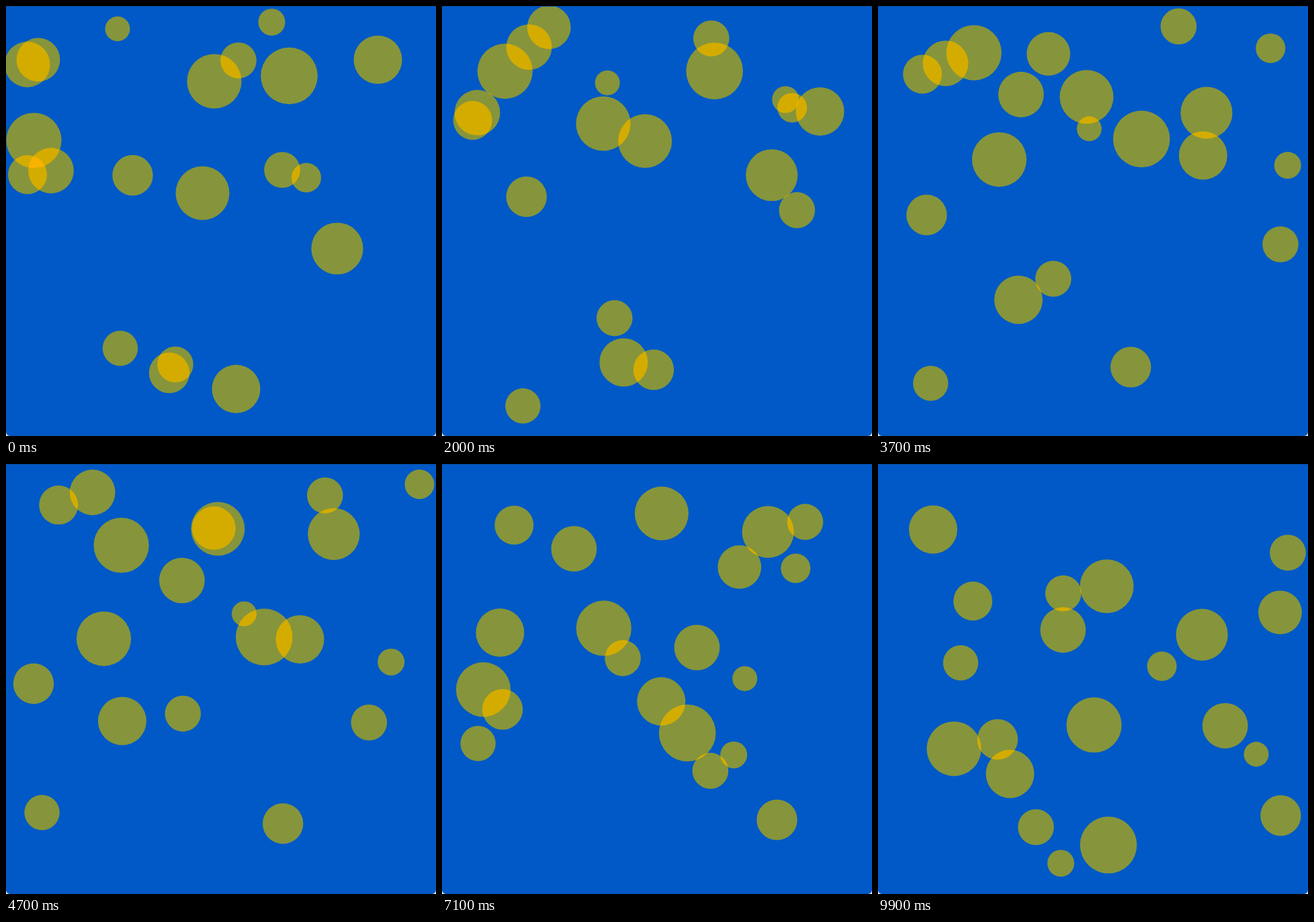
Write an HTML page with a canvas that moves like this. It is 640 px wide and 640 px high and loops after 10 s.

```html
<!DOCTYPE html>
<html lang="en">
<head>
<meta charset="utf-8">
<title>Drifting bubbles</title>
<style>
html, body { margin: 0; width: 100%; height: 100%; overflow: hidden; background: #0059c6; }
canvas { display: block; width: 640px; height: 640px; }
</style>
</head>
<body>
<canvas id="stage" width="640" height="640"></canvas>
<script>
const SIZE = 640, LOOP = 10000, STEP = 100;
const BLUE = '#0059c6';
// fill by number of overlapping bubbles
const TINTS = ['#86953b', '#d4ac00', '#f8b300'];
// walls the bubbles bounce off
const WALL_X = [-2.3, 640.4], WALL_Y = [-1.45, 641];

// launch state: radius, x, y, speed x, speed y (px/s)
const bubbles = [
  [18.5, 166, 34, 40.1, 40.2],
  [20, 395.5, 24, 57.9, 57.6],
  [22, 447, 255.5, 37.1, -52.06],
  [26.2, 170, 509.5, -24.77, 42.84],
  [26.8, 346, 81, 27.4, -16.4],
  [26.8, 411, 244, 58.7, 29.95],
  [26.8, 252, 533.5, 2.4, -34.45],
  [29, 32, 251, -12.1, -40.4],
  [30.2, 188.5, 252, -31.38, 15.95],
  [30.2, 243, 546, 36, -2.3],
  [32.4, 48, 80, 55.6, -24.15],
  [33.9, 67, 245, -28.2, -43.14],
  [33.9, 31.6, 87, 49, -41.58],
  [36, 553.5, 80, 46.34, 38.5],
  [36, 342.5, 570, -36.07, 54.8],
  [38.6, 493, 361, -1.1, -54.62],
  [40, 292.5, 278.5, 4.85, -38.73],
  [40.6, 310, 112, -35, 31.5],
  [41.1, 41.5, 200, -28.83, -51.43],
  [42.3, 421.5, 104, -7.93, -59.53]
];

const ctx = document.getElementById('stage').getContext('2d');

// fold a straight path back and forth between two walls
function bounce(p, [low, high], r) {
  const span = high - low - 2 * r;
  const d = Math.abs(p - low - r) % (2 * span);
  return low + r + Math.min(d, 2 * span - d);
}

function place([r, x, y, vx, vy], sec) {
  return { r, x: bounce(x + vx * sec, WALL_X, r), y: bounce(y + vy * sec, WALL_Y, r) };
}

function trace(c) {
  ctx.beginPath();
  ctx.arc(c.x, c.y, c.r, 0, Math.PI * 2);
}

const touch = (a, b) => Math.hypot(a.x - b.x, a.y - b.y) < a.r + b.r;

// extend each overlapping group by one more bubble
function widen(groups, discs) {
  return groups.flatMap(g => discs
    .slice(discs.indexOf(g[g.length - 1]) + 1)
    .filter(d => g.every(c => touch(c, d)))
    .map(d => [...g, d]));
}

function fillShared([first, ...rest], tint) {
  ctx.save();
  rest.forEach(c => { trace(c); ctx.clip(); });
  trace(first);
  ctx.fillStyle = tint;
  ctx.fill();
  ctx.restore();
}

function drawEdges() {
  ctx.fillStyle = '#0b4c9c';
  ctx.fillRect(0, 0, SIZE, 1);
  ctx.fillStyle = '#0453b6';
  ctx.fillRect(0, SIZE - 1, SIZE, 1);
  ctx.fillStyle = '#e4e9f0';
  ctx.beginPath();
  ctx.rect(0, 0, SIZE, SIZE);
  ctx.roundRect(0, 0, SIZE, SIZE, [0, 0, 6, 6]);
  ctx.fill('evenodd');
}

function draw(ms) {
  const discs = bubbles.map(b => place(b, ms / 1000));
  ctx.fillStyle = BLUE;
  ctx.fillRect(0, 0, SIZE, SIZE);
  let groups = discs.map(d => [d]);
  for (const tint of TINTS) {
    groups.forEach(g => fillShared(g, tint));
    groups = widen(groups, discs);
  }
  drawEdges();
}

const begin = performance.now();

function tick(now) {
  const ms = Math.max(0, now - begin) % LOOP;
  draw(Math.floor(ms / STEP) * STEP);
  requestAnimationFrame(tick);
}

draw(0);
requestAnimationFrame(tick);
</script>
</body>
</html>
```
